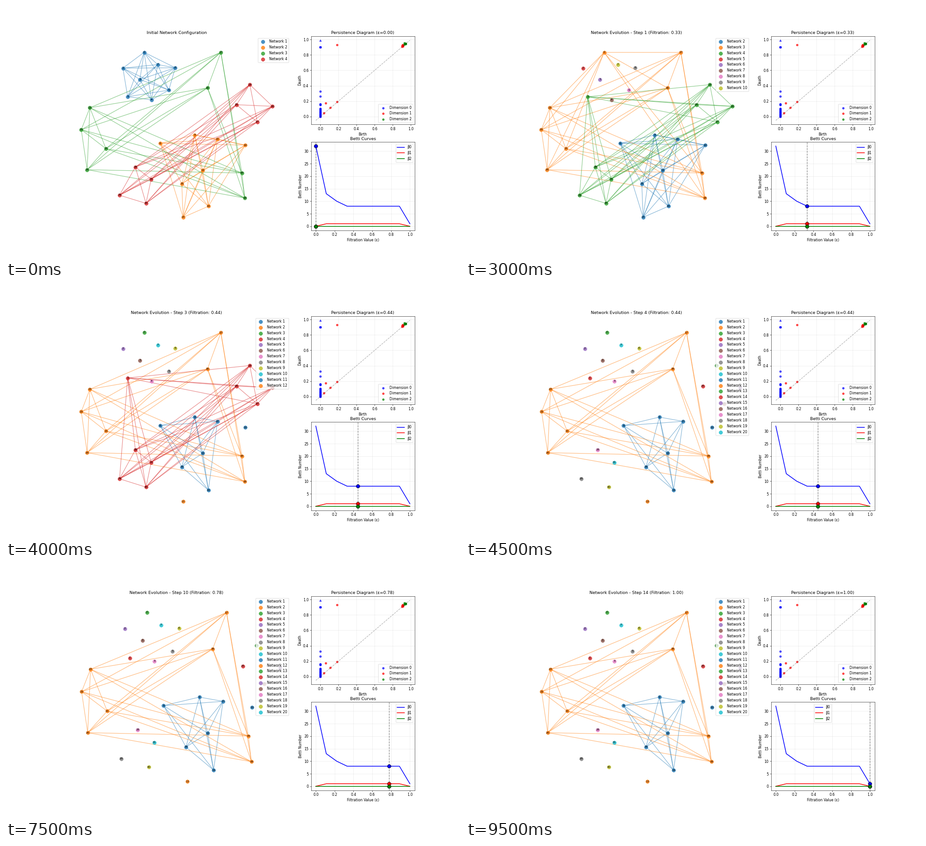
A matplotlib script for the animation above (10 s loop, 1004x558 px).

```python
from itertools import combinations

import matplotlib.pyplot as plt
import numpy as np
from matplotlib.animation import FuncAnimation
from matplotlib.collections import LineCollection

WIDTH, HEIGHT, DPI = 1004, 558, 55.8
FRAMES, INTERVAL = 20, 500
COLORS = plt.get_cmap("tab10").colors

# Node positions, y pointing down
POS = np.array([
    (305.5, 102.4), (269, 200.7), (258.5, 137.5), (296, 162.7),
    (321.5, 207.8), (360, 186.2), (374.2, 136.6), (335.5, 129.6),
    (341, 304), (417.2, 285.5), (529, 308), (467.5, 294.7),
    (435, 363.7), (391.5, 468), (447.5, 443.5), (388.7, 393.5),
    (445.5, 181.2), (475, 102.5), (528, 425.3), (521.5, 369.8),
    (179.5, 362.5), (221, 315.8), (166.5, 273.8), (185.5, 225.2),
    (539, 174), (509.5, 218.5), (589, 222), (555.5, 256.8),
    (286, 356.5), (251, 419), (309.5, 437), (321, 383.5),
])

EPS = np.linspace(0, 1, 10)
BETTI = [
    ("β0", "b", [32, 13, 10] + [8] * 6 + [1]),
    ("β1", "r", [0] + [1] * 8 + [0]),
    ("β2", "g", [0] * 10),
]

DEATHS = np.concatenate([
    0.105 * np.linspace(0, 1, 19) ** 1.5,
    [0.15, 0.155, 0.165, 0.26, 0.325],
    [0.9] * 7,
])
LOOPS = np.array([
    (0.04, 0.047), (0.06, 0.174), (0.11, 0.119), (0.185, 0.194),
    (0.183, 0.929), (0.905, 0.908), (0.905, 0.92), (0.908, 0.93),
    (0.913, 0.915), (0.916, 0.925),
])
VOIDS = np.array([
    (0.927, 0.935), (0.928, 0.953), (0.933, 0.942),
    (0.938, 0.948), (0.943, 0.94), (0.944, 0.946),
])


def networks(step):
    """Members of each network, by network id."""
    nets = {i + 1: list(range(8 * i, 8 * i + 8)) for i in range(4)}
    if step >= 1:
        del nets[1]
        nets[3].append(0)
        nets[4].append(1)
        nets.update({n + 3: [n] for n in range(2, 8)})
    if step >= 2:
        del nets[2]
        nets.update({1: [8, 9, 11, 12, 14, 15], 11: [10], 12: [13]})
    if step >= 3:
        nets.update({2: list(range(16, 24)), 3: [0]})
    if step >= 4:
        nets[4] = [1]
        nets.update({n - 11: [n] for n in range(24, 32)})
    return sorted(nets.items())


def padded_limits(nets):
    """Each network pads its own extent by 5%, then the view adds 5%."""
    corners = []
    for _, nodes in nets:
        low, high = POS[nodes].min(axis=0), POS[nodes].max(axis=0)
        pad = 0.05 * (high - low)
        corners += [low - pad, high + pad]
    low, high = np.min(corners, axis=0), np.max(corners, axis=0)
    margin = 0.05 * (high - low)
    return low - margin, high + margin


def draw_network(ax, step, eps):
    ax.clear()
    ax.axis("off")
    nets = networks(step)
    for i, (net_id, nodes) in enumerate(nets):
        color = COLORS[i % 10]
        ax.scatter(*POS[nodes].T, s=100, color=[color], alpha=0.8, zorder=2,
                   label=f"Network {net_id}")
        edges = [POS[list(pair)] for pair in combinations(nodes, 2)]
        if edges:
            ax.add_collection(LineCollection(
                edges, colors=[color], linewidths=1.5, alpha=0.55, zorder=1))
        for n in nodes:
            ax.text(*POS[n], str(n), fontsize=8, ha="center", va="center",
                    zorder=3)
    low, high = padded_limits(nets)
    ax.set_xlim(low[0], high[0])
    ax.set_ylim(high[1], low[1])
    ax.legend(loc="upper right")
    if step:
        ax.set_title(f"Network Evolution - Step {step} (Filtration: {eps:.2f})")
    else:
        ax.set_title("Initial Network Configuration")


def draw_persistence(ax, eps):
    ax.clear()
    style = dict(s=30, alpha=0.7)
    ax.plot([-0.05, 0.99], [-0.05, 0.99], "k--", alpha=0.3)
    ax.scatter(0 * DEATHS, DEATHS, c="blue", label="Dimension 0", **style)
    ax.scatter([0], [0.99], c="blue", marker="^", **style)
    ax.scatter(*LOOPS.T, c="red", label="Dimension 1", **style)
    ax.scatter(*VOIDS.T, c="green", label="Dimension 2", **style)
    ax.set_xlim(-0.102, 1.042)
    ax.set_ylim(-0.102, 1.042)
    ax.set_xlabel("Birth")
    ax.set_ylabel("Death")
    ax.set_title(f"Persistence Diagram (ε={eps:.2f})")
    ax.grid(True, alpha=0.3)
    ax.legend(loc="lower right")


def draw_betti(ax, k):
    ax.clear()
    for label, color, values in BETTI:
        ax.plot(EPS, values, color=color, linewidth=2, label=label)
    ax.axvline(EPS[k], color="k", linestyle="--", alpha=0.5)
    for _, color, values in BETTI:
        ax.scatter([EPS[k]], [values[k]], s=100, c=color, edgecolors="black",
                   zorder=5)
    ax.set_xlim(-0.05, 1.05)
    ax.set_ylim(-1.6, 33.6)
    ax.set_xlabel("Filtration Value (ε)")
    ax.set_ylabel("Betti Number")
    ax.set_title("Betti Curves")
    ax.grid(True, alpha=0.3)
    # The legend steps aside once the cursor reaches the right edge
    ax.legend(loc="upper right" if k < 8 else "upper center")


def update(frame):
    k = frame // 2
    draw_network(ax_net, max(0, frame - 5), EPS[k])
    draw_persistence(ax_diag, EPS[k])
    draw_betti(ax_betti, k)


# The tiny excess keeps the pixel size from rounding down
fig = plt.figure(figsize=((WIDTH + 0.001) / DPI, (HEIGHT + 0.001) / DPI),
                 dpi=DPI)
grid = fig.add_gridspec(2, 3)
ax_net = fig.add_subplot(grid[:, :2])
ax_diag = fig.add_subplot(grid[0, 2])
ax_betti = fig.add_subplot(grid[1, 2])

anim = FuncAnimation(fig, update, frames=FRAMES, interval=INTERVAL,
                     repeat=True, repeat_delay=0)
plt.show()
```
